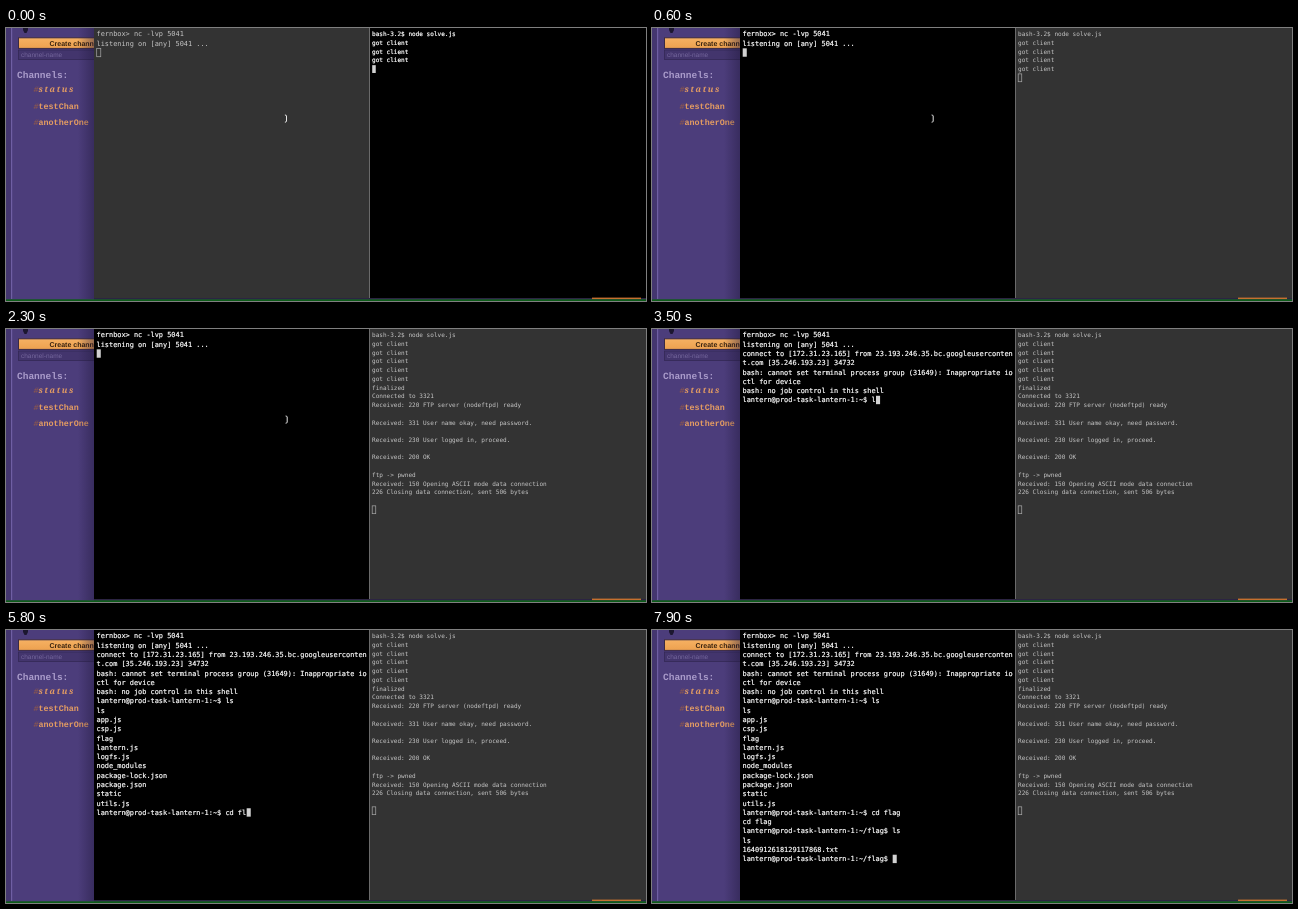
These frames come from a looping animation (640x273 px, 8 s). An HTML page:

```html
<!DOCTYPE html>
<html lang="en">
<head>
<meta charset="utf-8">
<title>Terminals</title>
<style>
html, body { margin: 0; width: 100%; height: 100%; overflow: hidden; background: #4c3d7b; }
svg { display: block; width: 640px; height: 273px; }
text { white-space: pre; text-rendering: geometricPrecision; }
.term { font-family: "DejaVu Sans Mono", monospace; }
.page { font-family: "Liberation Mono", monospace; font-weight: bold; fill: #e49c62; }
.ui { font-family: "Liberation Sans", sans-serif; }
.hash { fill: #8a5650; font-style: italic; }
.script { font-family: "Noto Serif", serif; font-style: italic; letter-spacing: 1.6px; }
</style>
</head>
<body>
<svg viewBox="0 0 640 273">
  <defs>
    <linearGradient id="button" x2="0" y2="1">
      <stop stop-color="#f6b163"/><stop offset="1" stop-color="#eda14f"/>
    </linearGradient>
    <linearGradient id="shade">
      <stop stop-color="#20183c" stop-opacity="0"/><stop offset="1" stop-color="#20183c" stop-opacity=".45"/>
    </linearGradient>
  </defs>

  <rect width="640" height="273" fill="#4c3d7b"/>
  <rect width="5" height="271" fill="#44366f"/>
  <rect x="5" width="1.2" height="271" fill="#6f5fa3"/>
  <path d="M17 0h5v2l-1.5 3h-2L17 2z" fill="#1c1730"/>
  <rect x="12.5" y="9.8" width="80" height="10.6" fill="url(#button)" stroke="#3a2a45" stroke-width="1"/>
  <text class="ui" x="43.5" y="17.6" font-size="7" font-weight="bold" fill="#39230f">Create channel</text>
  <rect x="12.5" y="22" width="80" height="9.5" fill="#43356d" stroke="#332856" stroke-width=".8"/>
  <text class="ui" x="15" y="28.9" font-size="6.5" fill="#75679d">channel-name</text>
  <g class="page">
    <text x="11" y="50" font-size="9.5" style="fill:#aa9ccb">Channels:</text>
    <text x="27.5" y="64.2" font-size="8.4"><tspan class="hash">#</tspan><tspan class="script">status</tspan></text>
    <text x="27.5" y="81" font-size="8.4"><tspan class="hash">#</tspan>testChan</text>
    <text x="27.5" y="97.3" font-size="8.4"><tspan class="hash">#</tspan>anotherOne</text>
  </g>
  <rect x="72" width="16" height="271" fill="url(#shade)"/>

  <g id="terminals" class="term"></g>

  <rect x="363" width="1" height="270" fill="#6a6a6a"/>
  <rect x="88" y="270" width="552" height="1.5" fill="#2c2442"/>
  <rect x="586" y="269.6" width="49" height="1.6" fill="#c6702f"/>
  <rect y="271.3" width="640" height="1.7" fill="#0c5c18"/>
  <path id="pointer" fill="none" stroke="#e4e4e4"
    d="M-1.6-3.6Q0-3.6 0-2.6V2.6Q0 3.6-1.6 3.6"/>
</svg>
<script>
const LOOP = 8000, FOCUS_SWITCH = 600;
const NS = "http://www.w3.org/2000/svg";
const PROMPT = "lantern@prod-task-lantern-1:";

// Each entry appends its text to the terminal at the given time.
const shellLog = [
  [0, "fernbox> nc -lvp 5041\nlistening on [any] 5041 ...\n"],
  [2500, "connect to [172.31.23.165] from 23.193.246.35.bc.googleuserconten\nt.com [35.246.193.23] 34732\n"],
  [2700, "bash: cannot set terminal process group (31649): Inappropriate io\nctl for device\nbash: no job control in this shell\n"],
  [2800, PROMPT + "~$ "],
  [3500, "l"], [3700, "s"], [4000, "\n"],
  [4400, "ls\napp.js\ncsp.js\nflag\nlantern.js\nlogfs.js\nnode_modules\npackage-lock.json\npackage.json\nstatic\nutils.js\n" + PROMPT + "~$ "],
  [5200, "c"], [5300, "d"], [5500, " "], [5600, "f"], [5800, "l"], [5900, "a"], [6000, "g"],
  [6200, "\ncd flag\n" + PROMPT + "~/flag$ "],
  [6400, "l"], [6600, "s"],
  [6800, "\nls\n1640912618129117868.txt\n" + PROMPT + "~/flag$ "]
];
const solverLog = [
  [0, "bash-3.2$ node solve.js\n" + "got client\n".repeat(3)],
  [300, "got client\n"],
  [1000, "got client\n"],
  [1200, "finalized\nConnected to 3321\n"],
  [1300, "Received: 220 FTP server (nodeftpd) ready\n\n"],
  [1500, "Received: 331 User name okay, need password.\n\n"],
  [1700, "Received: 230 User logged in, proceed.\n\n"],
  [1800, "Received: 200 OK\n\n"],
  [1900, "ftp -> pwned\n"],
  [2000, "Received: 150 Opening ASCII mode data connection\n"],
  [2100, "226 Closing data connection, sent 506 bytes\n\n"]
];

function add(parent, tag, attrs) {
  const node = parent.appendChild(document.createElementNS(NS, tag));
  set(node, attrs);
  return node;
}

function set(node, attrs) {
  for (const key in attrs) node.setAttribute(key, attrs[key]);
}

function makeTerminal({ log, left, width, textX, firstRow, pitch, size, rows }) {
  const group = add(document.getElementById("terminals"), "g", { "font-size": size });
  const back = add(group, "rect", { x: left, width, height: 270 });
  const textGroup = add(group, "g", {});
  const lines = Array.from({ length: rows }, (_, i) =>
    add(textGroup, "text", { x: textX, y: firstRow + i * pitch + size * 0.36 }));
  const cell = size * 0.602;
  const cursor = add(group, "rect", { width: cell - 0.1, height: pitch - 0.9, "stroke-width": 0.7 });
  let last = "";

  return (time, active) => {
    const content = log.filter(([at]) => at <= time).map(([, text]) => text).join("");
    const key = active + content;
    if (key === last) return;
    last = key;
    const shown = content.split("\n");
    const row = shown.length - 1;
    lines.forEach((line, i) => { line.textContent = shown[i] || ""; });
    set(back, { fill: active ? "#000" : "#333" });
    set(textGroup, active
      ? { fill: "#fff", stroke: "#fff", "stroke-width": 0.2 }
      : { fill: "#c6c6c6", stroke: "none" });
    set(cursor, {
      x: textX + shown[row].length * cell + 0.2,
      y: firstRow + row * pitch - pitch / 2 + 0.5,
      fill: active ? "#d2d2d2" : "none",
      stroke: active ? "none" : "#a8a8a8"
    });
  };
}

const drawShell = makeTerminal({
  log: shellLog, left: 88, width: 275, textX: 90.5, firstRow: 5.9, pitch: 9.29, size: 6.92, rows: 25
});
const drawSolver = makeTerminal({
  log: solverLog, left: 363, width: 277, textX: 366, firstRow: 6.1, pitch: 8.73, size: 6.05, rows: 21
});
const pointer = document.getElementById("pointer");

function draw(time) {
  const shellActive = time >= FOCUS_SWITCH;
  drawShell(time, shellActive);
  drawSolver(time, !shellActive);
  set(pointer, {
    transform: `translate(${time < 300 ? 280.5 : 281.2} 90.6)`,
    visibility: time < 2500 ? "visible" : "hidden"
  });
}

const start = performance.now();
function tick() {
  draw((performance.now() - start) % LOOP);
  requestAnimationFrame(tick);
}
tick();
</script>
</body>
</html>
```
